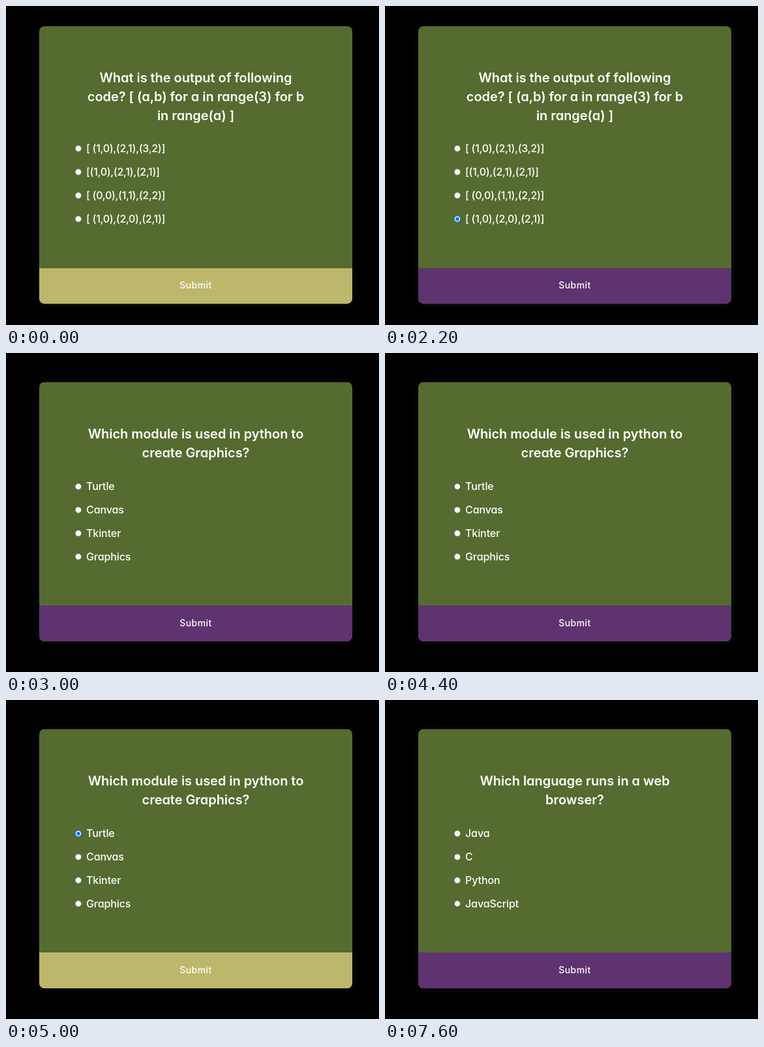
An HTML page that plays this animation: 572 by 489 pixels, repeating every 8000 ms.

```html
<!DOCTYPE html>
<html lang="en">
<head>
<meta charset="utf-8">
<title>Quiz</title>
<style>
html, body { margin: 0; width: 100%; height: 100%; overflow: hidden; background: #000; }
svg { display: block; width: 572px; height: 489px; }
text { fill: #fff; font-family: Inter, "Open Sans", sans-serif; font-feature-settings: "cv11"; white-space: pre; }
.title { font-size: 20px; font-weight: 600; letter-spacing: -.05px; text-anchor: middle; }
.option { font-size: 16px; font-weight: 500; letter-spacing: -.1px; }
.code { letter-spacing: -.3px; }
.submit { font-size: 14px; font-weight: 500; letter-spacing: .45px; text-anchor: middle; }
</style>
</head>
<body>
<svg id="stage" viewBox="0 0 572 489">
  <defs>
    <filter id="blur" x="-10%" y="-10%" width="120%" height="120%"><feGaussianBlur stdDeviation="4"/></filter>
    <clipPath id="round"><rect id="clip" x="51" width="480" rx="8"/></clipPath>
  </defs>
  <rect width="572" height="489"/>
  <rect id="shadow" x="49" width="484" rx="10" fill="#646464" opacity=".1" filter="url(#blur)"/>
  <g clip-path="url(#round)">
    <rect id="card" x="51" width="480" fill="#556b2f"/>
    <rect id="button" x="51" width="480" height="60"/>
  </g>
  <g id="content"></g>
</svg>
<script>
const LOOP = 8000;
const KHAKI = '#bdb76b', PURPLE = '#5e3370';

const tall = { top: 31, bottom: 456.4, split: 402, title: 116.5, radio: 218.5, pitch: 36, submit: 433 };
const short = { top: 44.5, bottom: 442, split: 387, title: 130.5, radio: 204.8, pitch: 35.8, submit: 419 };

const slides = [
  { at: 0, box: tall, code: true,
    title: ['What is the output of following', 'code? [ (a,b) for a in range(3) for b', 'in range(a) ]'],
    options: ['[ (1,0),(2,1),(3,2)]', '[(1,0),(2,1),(2,1)]', '[ (0,0),(1,1),(2,2)]', '[ (1,0),(2,0),(2,1)]'] },
  { at: 2300, box: short,
    title: ['Which module is used in python to', 'create Graphics?'],
    options: ['Turtle', 'Canvas', 'Tkinter', 'Graphics'] },
  { at: 5600, box: short,
    title: ['Which language runs in a web', 'browser?'],
    options: ['Java', 'C', 'Python', 'JavaScript'] }
];

// Each track lists [start time, value]; -1 means no option.
const hover = [[0, -1], [1100, 3], [1500, -1], [2900, 3], [3000, -1], [3800, 0], [4000, -1],
  [4400, 0], [4800, 1], [4900, 2], [5000, -1], [7600, 3]];
const checked = [[0, -1], [1200, 3], [2300, -1], [4600, 0], [5600, -1]];
const fill = [[0, KHAKI], [2200, PURPLE], [4600, KHAKI], [5600, PURPLE]];

const $ = id => document.getElementById(id);
const valueAt = (track, t) => track.filter(([start]) => start <= t).pop()[1];

function make(tag, attrs, parent, text) {
  const el = document.createElementNS('http://www.w3.org/2000/svg', tag);
  setAll(el, attrs);
  if (text) el.textContent = text;
  return parent.appendChild(el);
}

function setAll(el, attrs) {
  for (const key in attrs) el.setAttribute(key, attrs[key]);
}

function build(slide) {
  const { box } = slide;
  slide.group = make('g', {}, $('content'));
  slide.title.forEach((line, i) =>
    make('text', { class: 'title', x: 291, y: box.title + 29 * i }, slide.group, line));
  slide.radios = slide.options.map((label, i) => {
    const y = box.radio + box.pitch * i;
    make('text', { class: slide.code ? 'option code' : 'option', x: 123, y: y + 5.5 }, slide.group, label);
    return {
      ring: make('circle', { cx: 110.9, cy: y, r: 4.7, fill: '#fff' }, slide.group),
      dot: make('circle', { cx: 110.9, cy: y, r: 2.9 }, slide.group)
    };
  });
  make('text', { class: 'submit', x: 291, y: box.submit }, slide.group, 'Submit');
}

function drawRadio({ ring, dot }, isHover, isChecked) {
  const blue = isHover ? '#005cc8' : '#0075ff';
  const grey = isHover ? '#4f4f4f' : '#767676';
  setAll(ring, { stroke: isChecked ? blue : grey, 'stroke-width': isChecked ? 1 : .8 });
  setAll(dot, { fill: isChecked ? blue : 'none' });
}

function render(t) {
  const current = slides.filter(s => s.at <= t).pop();
  const { top, bottom, split } = current.box;
  for (const id of ['clip', 'card']) setAll($(id), { y: top, height: bottom - top });
  setAll($('shadow'), { y: top - 1, height: bottom - top + 4 });
  setAll($('button'), { y: split, fill: valueAt(fill, t) });
  for (const s of slides) setAll(s.group, { display: s === current ? 'inline' : 'none' });
  const over = valueAt(hover, t), chosen = valueAt(checked, t);
  current.radios.forEach((radio, i) => drawRadio(radio, i === over, i === chosen));
}

function tick() {
  render(performance.now() % LOOP);
  requestAnimationFrame(tick);
}

slides.forEach(build);
tick();
</script>
</body>
</html>
```
